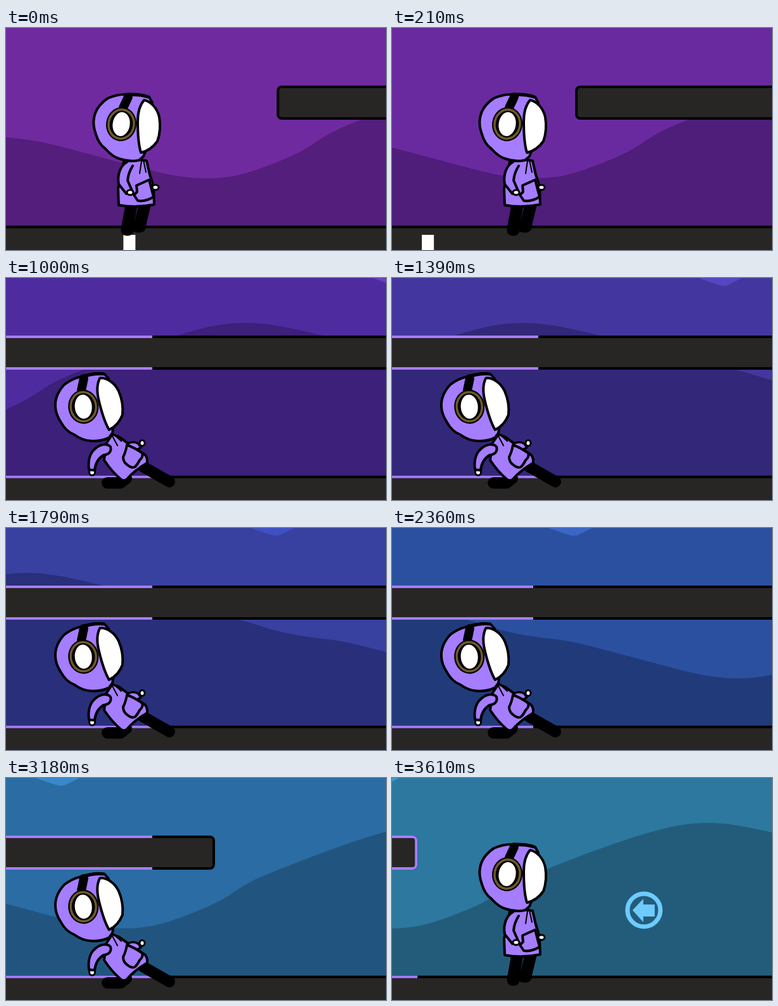
An HTML page with a canvas that plays this animation: 600x351 px, repeating every 3640 ms.

```html
<!DOCTYPE html>
<html lang="en">
<head>
<meta charset="utf-8">
<title>Slide run</title>
<style>
html, body { margin: 0; width: 100%; height: 100%; overflow: hidden; background: #702a9f; }
canvas { display: block; }
</style>
</head>
<body>
<canvas id="stage" width="600" height="351"></canvas>
<script>
const LOOP = 3640;
const W = 600, H = 351;
const g = document.getElementById('stage').getContext('2d');

const DARK = '#272624', LILAC = '#a57dff', CYAN = '#6ecbfb';

// time, sky, hill, far peak
const PALETTE = [
  [0, 0x702a9f, 0x541e7c, 0x8a45c4],
  [520, 0x6029a0, 0x481c78, 0x7c40c2],
  [1000, 0x4e2c9f, 0x3c2079, 0x6a3fc0],
  [1790, 0x3840a0, 0x292f7a, 0x3f50c4],
  [2360, 0x2c50a0, 0x213b7a, 0x3a66c8],
  [3180, 0x2a6ca3, 0x215580, 0x3a88cc],
  [3640, 0x2c799f, 0x235d7b, 0x4399cf]
];

// one period of the hill ridge
const PERIOD = 1265;
const RIDGE = [
  [0, 173], [50, 178], [120, 196], [190, 215], [255, 232], [310, 239], [365, 235],
  [425, 214], [472, 193], [512, 165], [560, 145], [640, 114], [710, 90], [770, 74],
  [818, 70], [865, 74], [940, 91], [1050, 119], [1160, 146], [1215, 164]
];

const SLIDE_FROM = 300, SLIDE_TO = 3333;

function mix(a, b, k) {
  const part = s => Math.round((a >> s & 255) * (1 - k) + (b >> s & 255) * k);
  return `rgb(${part(16)},${part(8)},${part(0)})`;
}

function colours(t) {
  let i = 0;
  while (t > PALETTE[i + 1][0]) i++;
  const a = PALETTE[i], b = PALETTE[i + 1];
  const k = (t - a[0]) / (b[0] - a[0]);
  return [1, 2, 3].map(n => mix(a[n], b[n], k));
}

function rect(x, y, w, h, fill) {
  g.fillStyle = fill;
  g.fillRect(x, y, w, h);
}

function shape(d, fill, line = 4, ink = '#000') {
  const p = new Path2D(d);
  if (fill) { g.fillStyle = fill; g.fill(p); }
  if (line) { g.strokeStyle = ink; g.lineWidth = line; g.stroke(p); }
}

function oval(x, y, rx, ry, fill, line, ink = '#000', tilt = 0) {
  g.beginPath();
  g.ellipse(x, y, rx, ry, tilt, 0, 7);
  if (fill) { g.fillStyle = fill; g.fill(); }
  if (line) { g.strokeStyle = ink; g.lineWidth = line; g.stroke(); }
}

function hills(t, fill) {
  const shift = t * 0.4386;
  const pts = [];
  for (let n = -1; n < 3; n++) {
    for (const [x, y] of RIDGE) pts.push([x + n * PERIOD - shift, y]);
  }
  g.fillStyle = fill;
  g.beginPath();
  g.moveTo(pts[0][0], H);
  for (let i = 0; i < pts.length - 1; i++) {
    const [x, y] = pts[i], [u, v] = pts[i + 1];
    g.quadraticCurveTo(x, y, (x + u) / 2, (y + v) / 2);
  }
  g.lineTo(pts[pts.length - 1][0], H);
  g.fill();
}

function peak(t, fill) {
  g.save();
  g.translate(864 - t * 0.244, 0);
  shape('M-44 -1L-24 6L-8 11Q0 14 8 10L30 -1Z', fill, 0);
  g.restore();
}

function platform(t) {
  const left = 428 - t * 0.658, right = 2474 - t * 0.674;
  const beat = t % 92;
  const edge = beat > 55 && beat < 75 ? 223 : 231;
  const outline = ink => {
    g.strokeStyle = ink;
    g.lineWidth = 4;
    g.stroke();
  };

  g.beginPath();
  g.roundRect(left + 2, 93, right - left - 4, 50, 6);
  g.fillStyle = DARK;
  g.fill();
  outline('#000');

  g.save();
  const path = new Path2D();
  path.rect(0, 0, edge, H);
  g.clip(path);
  outline(LILAC);
  rect(left, 312.5, right - left, 4, LILAC);
  g.restore();
}

function arrowSign(t) {
  g.save();
  g.translate(2831.6 - t * 0.674, 209);
  oval(0, 0, 26, 26, null, 7, CYAN);
  shape('M-18 0L-1 -18V-9H17V10H-1V19Z', CYAN, 0);
  g.restore();
}

function head() {
  shape('M226 109C214 104 200 104 187 105C176 105 168 108 161 111C149 119 141 130 139 142' +
    'C137 152 139 160 142 168C145 179 150 186 157 191C164 199 172 205 180 207' +
    'C192 211 202 211 210 209L217 203L226 180L231 118Z', LILAC);
  shape('M218 114C211 122 208 133 208 148C208 166 209 184 213 197C223 195 232 189 239 179' +
    'C243 168 244 153 242 141C239 127 229 116 218 114Z', '#fff');
  shape('M185 126L193 109', null, 14);
  shape('M190 106Q210 104 224 109', null, 5);
  const tilt = 0.15;
  oval(182, 152, 24, 27, '#000', 0, '', tilt);
  oval(182, 152, 20, 23, null, 3.5, '#705a28', tilt);
  oval(182, 152, 13.5, 19, '#fff', 0, '', tilt);
}

function standing() {
  shape('M198 280L191 318M219 280L211 313', null, 19);
  shape('M190 320H193M207 315H212', null, 17);
  shape('M186 211Q205 206 222 210L227 232L233 252L234 279Q206 285 178 280L177 254Z', LILAC);
  oval(236, 252, 5, 4, '#fff', 3);
  shape('M227 231L232 247L227 253', LILAC, 3.5);
  shape('M191 212C181 217 175 232 178 247L190 262L199 257L192 241Q193 229 200 218', LILAC);
  oval(196, 260, 5, 4, '#fff', 3);
  shape('M206 249L226 240L233 267Q220 275 208 273L202 264L207 259Z', LILAC);
  shape('M214 210L211 230M217 209L221 228', null, 2);
  head();
}

function sliding() {
  shape('M216 298L258 322', null, 18);
  shape('M160 324H181L190 317', null, 18);
  shape('M168 247L178 251L192 261L207 271L220 280Q225 288 222 293Q203 304 191 318' +
    'Q186 322 181 318Q167 306 155 288L158 262Z', LILAC);
  oval(215, 261, 4, 4.5, '#fff', 3);
  shape('M192 262Q201 257 209 262L213 268L207 271', LILAC, 3.5);
  oval(136, 307, 4.5, 5, '#fff', 3);
  shape('M165 267C161 262 151 262 143 268C133 275 129 288 131 303L140 304' +
    'C141 293 146 285 154 280C162 279 167 275 165 267Z', LILAC);
  shape('M191 264Q189 275 185 283Q185 291 191 295Q198 301 203 299Q207 296 211 288' +
    'Q217 283 215 277Q203 268 191 264Z', LILAC);
  shape('M171 248L182 258M168 250L176 265', null, 2);
  g.save();
  g.translate(163, 241);
  g.rotate(-0.235);
  g.translate(-213, -198);
  head();
  g.restore();
}

function draw(t) {
  const [sky, hill, far] = colours(t);
  rect(0, 0, W, H, sky);
  peak(t, far);
  hills(t, hill);
  rect(0, 313, W, 38, DARK);
  rect(0, 312.5, W, 4, '#000');
  platform(t);
  arrowSign(t);
  rect(186 - t * 0.658, 327, 19, 24, '#fff');
  if (t >= SLIDE_FROM && t < SLIDE_TO) sliding();
  else standing();
}

g.lineCap = g.lineJoin = 'round';
const start = performance.now();
function tick() {
  draw((performance.now() - start) % LOOP);
  requestAnimationFrame(tick);
}
tick();
</script>
</body>
</html>
```
